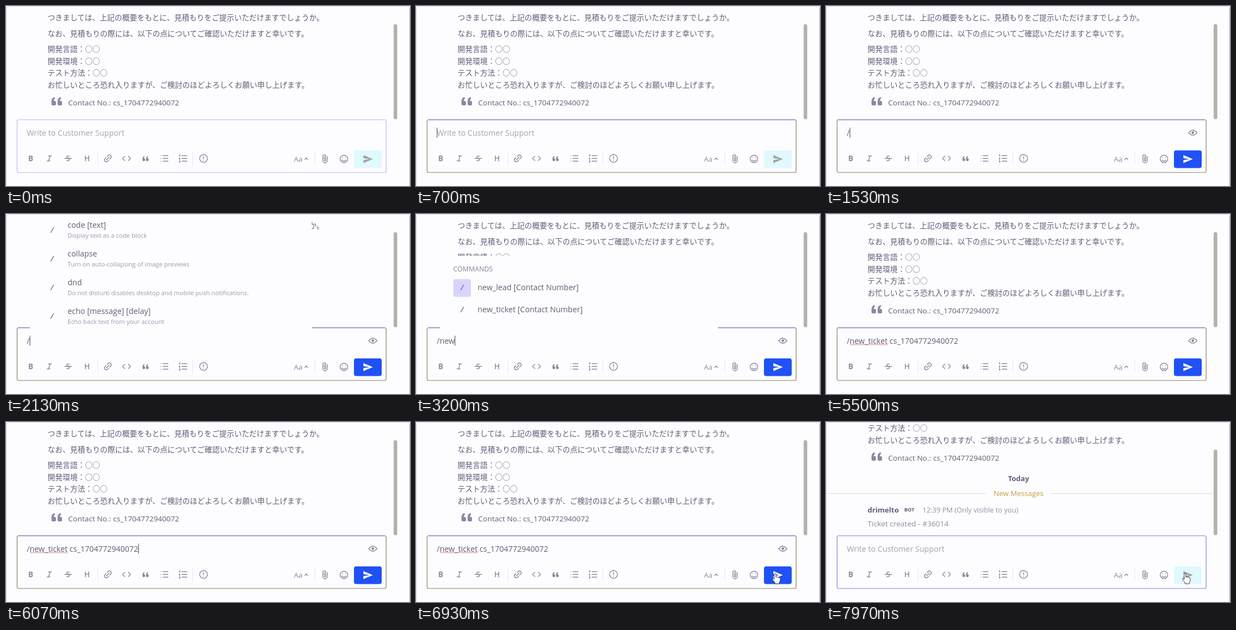
An HTML page for the animation above (8 s loop, 728 by 326 pixels).

```html
<!DOCTYPE html>
<html lang="ja">
<head>
<meta charset="utf-8">
<title>Ticket command</title>
<style>
  html, body { margin: 0; width: 100%; height: 100%; overflow: hidden; background: #fdfdff; }
  svg { display: block; width: 728px; height: 326px; }
  text { font: 13.5px "Open Sans", "Noto Sans CJK JP", "Noto Sans CJK", sans-serif; fill: #5f5d78; white-space: pre; }
  .jp text { font-family: "Noto Sans CJK JP", "Noto Sans CJK", sans-serif; font-weight: 300; }
  .line { fill: none; stroke: #8b89a2; stroke-width: 1.4; stroke-linecap: round; stroke-linejoin: round; }
  .fill { fill: #8b89a2; stroke: none; }
  .rule { stroke: #e6e4f8; stroke-width: 1; }
  #tools text { fill: #8b89a2; font-weight: 700; text-anchor: middle; }
  #tools .plain { font-weight: 400; }
  #typed, #hint, .menu text { font-size: 14px; }
  #hint { fill: #a3a1b5; }
  .menu .small { font-size: 11.2px; fill: #9a98b0; }
  .menu .head { font-size: 12.2px; fill: #85839b; }
  .menu .slash { font-style: italic; font-weight: 600; fill: #77758f; text-anchor: middle; }
  .mid { text-anchor: middle; }
  .bold { font-weight: 700; }
</style>
</head>
<body>
<svg viewBox="0 0 728 326">
  <defs>
    <g id="quote" transform="rotate(180 9.500 7.500)"><path class="fill" d="M0 2q0-2 2-2h4q2 0 2 2v6q0 6-6 7v-3q2-1 2-4h-2q-2 0-2-2zM11 2q0-2 2-2h4q2 0 2 2v6q0 6-6 7v-3q2-1 2-4h-2q-2 0-2-2z"/></g>
  </defs>
  <rect width="728" height="326" fill="#fdfdff"/>

  <g id="messages">
    <g class="jp">
      <text x="75" y="26">つきましては、上記の概要をもとに、見積もりをご提示いただけますでしょうか。</text>
      <text x="75" y="55">なお、見積もりの際には、以下の点についてご確認いただけますと幸いです。</text>
      <text x="75" y="83">開発言語：○○</text>
      <text x="75" y="105">開発環境：○○</text>
      <text x="75" y="126">テスト方法：○○</text>
      <text x="75" y="148">お忙しいところ恐れ入りますが、ご検討のほどよろしくお願い申し上げます。</text>
    </g>
    <use href="#quote" x="82" y="165"/>
    <text x="112" y="180">Contact No.: cs_1704772940072</text>
  </g>

  <g id="reply">
    <text class="mid bold" x="347" y="106.5" style="font-size:13px">Today</text>
    <path d="M0 129.5H288M405 129.5H697" stroke="#dfdccb"/>
    <text class="mid" x="347" y="134" style="font-size:13px;fill:#c79a3e">New Messages</text>
    <text class="bold" x="75" y="163.5" style="font-size:13px">drimelto</text>
    <text class="bold" x="141" y="162" style="font-size:9px">BOT</text>
    <text x="174" y="163.5" style="font-size:12.6px;fill:#9290a6">12:39 PM (Only visible to you)</text>
    <text x="75" y="189" style="fill:#8d8ba3">Ticket created - #36014</text>
  </g>

  <rect id="bar" x="698.5" width="6.5" rx="3" fill="#b3b2ac"/>
  <path d="M0.5 326V4Q0.5 0.5 4 0.5H724Q727.5 0.5 727.5 4" fill="none" stroke="#d5d2f6"/>
  <path d="M727.5 4V326" stroke="#a5a2c8"/>

  <rect id="box" x="20" y="206" width="665" height="95.5" rx="3" fill="#fdfdff" stroke-width="1.7"/>
  <path id="boxTop" d="M22 206H683" stroke="#9d9acf" stroke-width="1.5"/>

  <g id="tools">
    <text x="44.5" y="280.5">B</text>
    <path class="line" d="M76.500 271.500H82M74 280.500H79.500M79.300 271.500L76.700 280.500" stroke-width="1.800"/>
    <text x="112" y="280.5" style="font-weight:600">S</text>
    <path class="line" d="M106 276H118.500"/>
    <text x="146" y="280.5" style="font-weight:600">H</text>
    <path class="rule" d="M165.500 264V288M336.500 264V288M556.500 264V288"/>
    <g class="line" transform="translate(183.500 276) rotate(-45)">
      <path d="M-1.500-3.300H-4a3.300 3.300 0 0 0 0 6.600H-1.500M1.500-3.300H4a3.300 3.300 0 0 1 0 6.600H1.500M-3.500 0H3.500"/>
    </g>
    <path class="line" d="M214 272l-4 4 4 4M220.500 272l4 4-4 4"/>
    <use href="#quote" transform="translate(246 272) scale(.58)"/>
    <path class="line" d="M283 271H292M283 276H292M283 281H292M279 271h.1M279 276h.1M279 281h.1"/>
    <path class="line" d="M317 271H326M317 276H326M317 281H326M312.500 270l.7-.7v3M312.200 275.500h1.200l-1.200 2h1.200M312.200 280.500h1.200v2h-1.200"/>
    <circle class="line" cx="356" cy="276" r="7"/>
    <path class="line" d="M356 272.500V276.500M356 279.300v.1"/>
    <text class="plain" x="526.500" y="281.500" style="font-size:13px">Aa</text>
    <path class="line" d="M538.500 278l2.700-2.700 2.700 2.700"/>
    <path class="line" d="M579 272.500V280a4 4 0 0 1-8 0V272a2.600 2.600 0 0 1 5.200 0V279.500a1.200 1.200 0 0 1-2.400 0V273"/>
    <circle class="line" cx="609" cy="277" r="6.800"/>
    <path class="line" d="M605.500 279q3.500 4 7 0M606.500 274.800h.1M611.500 274.800h.1"/>
  </g>

  <rect id="send" x="627" y="261.500" width="50" height="32" rx="4"/>
  <path id="plane" d="M644 270L661 277.300L644 284.600V279L655 277.300L644 275.600Z"/>
  <g id="eye" class="line">
    <path d="M653.500 229.500Q661 220.500 668.500 229.500Q661 238.500 653.500 229.500Z"/>
    <circle class="fill" cx="661" cy="229.500" r="2.400"/>
  </g>

  <g id="allMenu" class="menu"></g>
  <g id="newMenu" class="menu"></g>

  <text id="hint" x="37.500" y="234.500">Write to Customer Support</text>
  <text id="typed" x="37.500" y="234.500"></text>
  <path id="wave" fill="none" stroke="#e0584f" stroke-width="1"/>
  <path id="caret" d="M0 220.500V238.500" stroke="#4b4966" stroke-width="1.100"/>
  <path id="hand" fill="#fff" stroke="#3e3c52" stroke-width="1" stroke-linejoin="round"
    d="M-1.500 1Q0-1 1.500 1V7Q3 5.500 4.300 7.300Q6 6 7 8Q9 7 9.300 9.500V13Q9 15 7.500 17V19H0V17L-4.500 11.500Q-5 9-2.800 9.500L-1.500 11Z"/>
</svg>

<script>
const $ = id => document.getElementById(id);
const LOOP = 8000, BLINK = 530, INPUT_X = 37.5;
const SCROLL_AT = 7970, SENT_AT = 6970;
const HAND = { from: 6500, to: 6800, x0: 612, y0: 262, x: 647, y: 274 };

// Each step holds until the next one; the caret blink restarts with it.
const steps = [
  { at: 0, text: '' },
  { at: 500, text: '', focus: true },
  { at: 1500, text: '/', focus: true },
  { at: 1610, text: '/', focus: true, menu: 'all' },
  { at: 2200, text: '/n', focus: true, menu: 'lead' },
  { at: 2500, text: '/ne', focus: true, menu: 'lead' },
  { at: 2800, text: '/new', focus: true, menu: 'lead' },
  { at: 3550, text: '/new', focus: true, menu: 'ticket' },
  { at: 3950, text: '/new_ticket ', focus: true },
  { at: 4950, text: '/new_ticket cs_1704772940072', focus: true, wave: true },
  { at: SENT_AT, text: '', focus: true }
];

const panel = (y, width) =>
  `<rect x="43" y="${y}" width="${width}" height="${207 - y}" fill="#fdfdff"/>`;
const slash = y => `<text class="slash" x="83" y="${y}">/</text>`;

$('allMenu').innerHTML = panel(1, 508) + [
  ['code [text]', 'Display text as a code block'],
  ['collapse', 'Turn on auto-collapsing of image previews'],
  ['dnd', 'Do not disturb disables desktop and mobile push notifications.'],
  ['echo [message] [delay]', 'Echo back text from your account']
].map(([name, note], i) => {
  const y = 25 + i * 52;
  return `${slash(y + 9)}<text x="111" y="${y}">${name}</text>` +
    `<text class="small" x="111" y="${y + 18}">${note}</text>`;
}).join('');

$('newMenu').innerHTML = panel(76, 501) +
  '<text class="head" x="67" y="104">COMMANDS</text>' +
  '<rect id="pick" x="67" width="32" height="32" rx="4" fill="#d8d5fc"/>' +
  ['new_lead', 'new_ticket'].map((name, i) =>
    `${slash(138 + i * 40)}<text x="111" y="${137.5 + i * 40}">${name} [Contact Number]</text>`
  ).join('');

$('wave').setAttribute('d', 'M43 236.5q1-2 2 0' + 't2 0'.repeat(33));

const show = (id, on) => { $(id).style.display = on ? '' : 'none'; };
const set = (id, attrs) => {
  for (const key in attrs) $(id).setAttribute(key, attrs[key]);
};

function draw(t) {
  const step = steps.findLast(s => s.at <= t);
  const sent = t >= SENT_AT, scrolled = t >= SCROLL_AT;
  const full = step.text !== '';

  set('messages', { transform: `translate(0 ${scrolled ? -110 : 0})` });
  show('reply', scrolled);
  set('bar', { y: scrolled ? 50 : 33, height: scrolled ? 155 : 172 });

  set('box', { stroke: sent ? '#aaa7e3' : step.focus ? '#a8a896' : '#cfccf4' });
  show('boxTop', step.focus && !sent);
  set('send', { fill: full ? '#1f51f5' : '#dff9ff' });
  set('plane', { fill: full ? '#fff' : '#a3a49f' });
  show('eye', full);

  show('allMenu', step.menu === 'all');
  show('newMenu', step.menu === 'lead' || step.menu === 'ticket');
  set('pick', { y: step.menu === 'ticket' ? 158 : 118 });

  show('hint', !full);
  if ($('typed').textContent !== step.text) $('typed').textContent = step.text;
  show('wave', step.wave);
  const x = INPUT_X + (full ? $('typed').getComputedTextLength() : 0) + 0.5;
  set('caret', { transform: `translate(${x} 0)` });
  show('caret', step.focus && Math.floor((t - step.at) / BLINK) % 2 === 0);

  const p = Math.min(1, Math.max(0, (t - HAND.from) / (HAND.to - HAND.from)));
  const ease = 1 - (1 - p) ** 2;
  const hx = HAND.x0 + (HAND.x - HAND.x0) * ease;
  const hy = HAND.y0 + (HAND.y - HAND.y0) * ease;
  set('hand', { transform: `translate(${hx} ${hy})` });
  show('hand', t >= HAND.from);
}

const start = performance.now();
function tick() {
  draw((performance.now() - start) % LOOP);
  requestAnimationFrame(tick);
}
tick();
</script>
</body>
</html>
```
